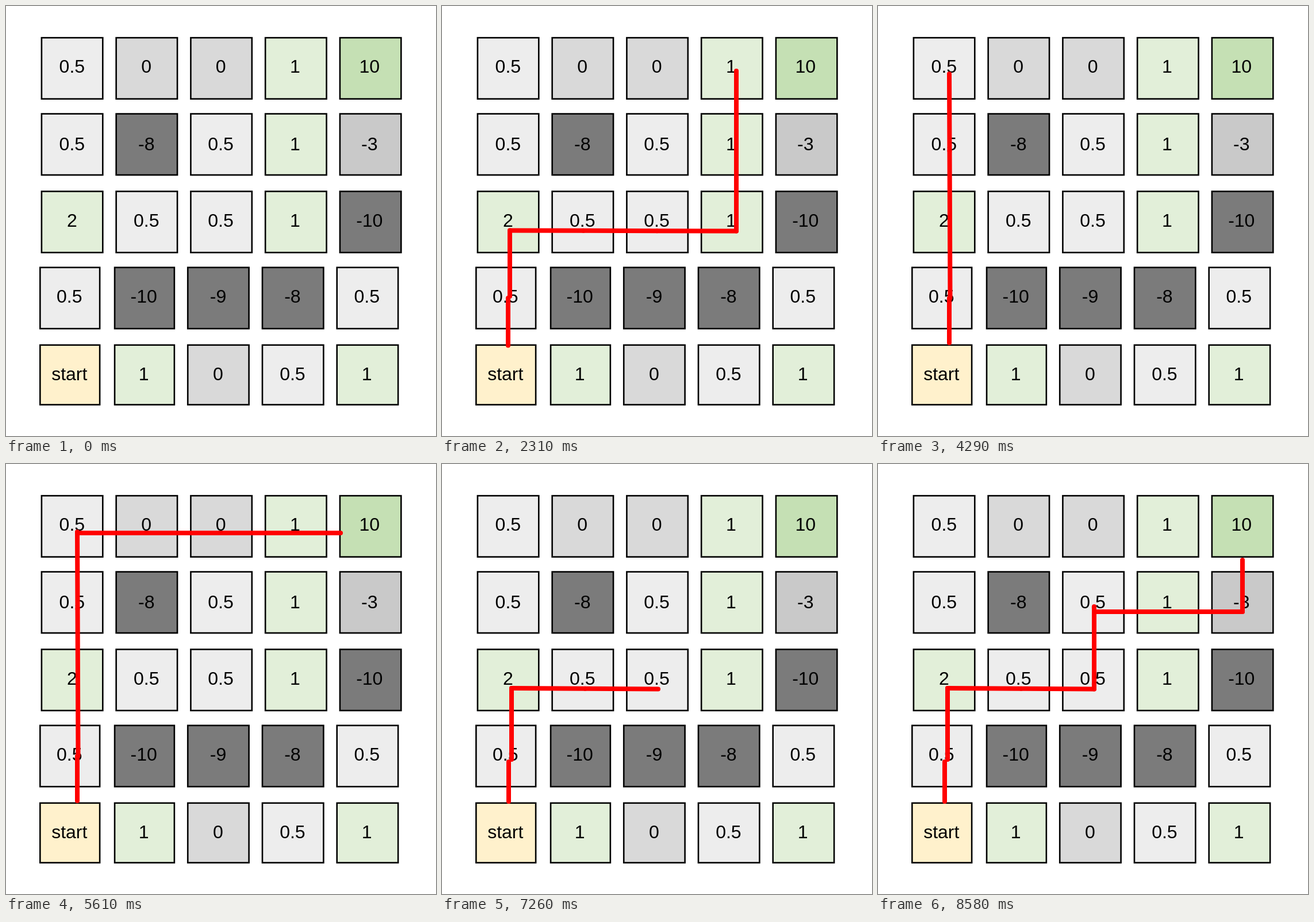
An HTML page that plays this animation: 748x748 px, repeating every 8.91 s.

```html
<!DOCTYPE html>
<html lang="en">
<head>
<meta charset="utf-8">
<title>Grid paths</title>
<style>
html, body { margin: 0; width: 100%; height: 100%; overflow: hidden; background: #fff; }
svg { display: block; width: 100vw; height: 100vh; }
rect { stroke: #000; stroke-width: 2.6; }
text { font: 32px "Liberation Sans", Arial, sans-serif; text-anchor: middle; }
line { stroke: #f00; stroke-width: 8; stroke-linecap: round; }
</style>
</head>
<body>
<svg id="stage" viewBox="0 0 748 748"></svg>
<script>
const STEP = 330, SLOTS = 9, MOVE = 128;
const stage = document.getElementById('stage');

function add(tag, attrs, label) {
  const el = document.createElementNS('http://www.w3.org/2000/svg', tag);
  for (const key in attrs) el.setAttribute(key, attrs[key]);
  if (label) el.textContent = label;
  return stage.appendChild(el);
}

function shade(value) {
  if (value === 'start') return '#fff1cc';
  if (value >= 10) return '#c5e0b4';
  if (value >= 1) return '#e2efd9';
  if (value > 0) return '#ededed';
  if (value >= 0) return '#d9d9d9';
  return value >= -3 ? '#c9c9c9' : '#7b7b7b';
}

// cells sit on an even pitch, with edges snapped down to a coarse unit
const UNIT = 2.595, SIZE = 40.75;
const px = n => 61.9 + n * UNIT;
const py = n => 55.2 + n * UNIT;

function addCell(value, col, row) {
  const x = 0.95 + 49.85 * col - (row > 2 ? 1.75 : 0);
  const y = 0.5 + 51.4 * row;
  const left = Math.floor(x), top = Math.floor(y);
  add('rect', {
    x: px(left), y: py(top),
    width: (Math.floor(x + SIZE) - left) * UNIT,
    height: (Math.floor(y + SIZE) - top) * UNIT,
    fill: shade(value)
  });
  add('text', { x: px(x + 19.45), y: py(Math.floor(y + 0.2) + 23.6) }, value);
}

const grid = [
  '0.5 0 0 1 10',
  '0.5 -8 0.5 1 -3',
  '2 0.5 0.5 1 -10',
  '0.5 -10 -9 -8 0.5',
  'start 1 0 0.5 1'
];
grid.forEach((cells, row) => cells.split(' ').forEach((value, col) => addCell(value, col, row)));

// corners of each route; a short hop between two points lifts the pen
const routes = [
  '115,590.5 115,508 118,505 118,390.5 512,391.5 512,113 512,118 579,118',
  '124,586 124,508 125.5,508 124,118 124,120 582,120',
  '116,587 116,518 121,514 121,390 376,391.5 376,248 377,257 634,257 634,167'
];

// cut every leg into moves of one cell, the last taking what is left
function addRoute(route) {
  const points = route.split(' ').map(p => p.split(',').map(Number));
  const moves = [];
  points.slice(1).forEach(([bx, by], i) => {
    const [ax, ay] = points[i];
    const length = Math.hypot(bx - ax, by - ay);
    const count = Math.round(length / MOVE);
    const at = k => k === count ? 1 : k * MOVE / length;
    for (let k = 0; k < count; k++) {
      const s = at(k), e = at(k + 1);
      moves.push(add('line', {
        x1: ax + (bx - ax) * s, y1: ay + (by - ay) * s,
        x2: ax + (bx - ax) * e, y2: ay + (by - ay) * e
      }));
    }
  });
  return moves;
}

const lines = routes.map(addRoute);

function draw(time) {
  const step = Math.floor(time / STEP) % (SLOTS * lines.length);
  const active = Math.floor(step / SLOTS), count = step % SLOTS;
  lines.forEach((moves, r) => moves.forEach((line, i) =>
    line.setAttribute('visibility', r === active && i < count ? 'visible' : 'hidden')));
}

const begin = performance.now();
function tick() {
  draw(performance.now() - begin);
  requestAnimationFrame(tick);
}
tick();
</script>
</body>
</html>
```
